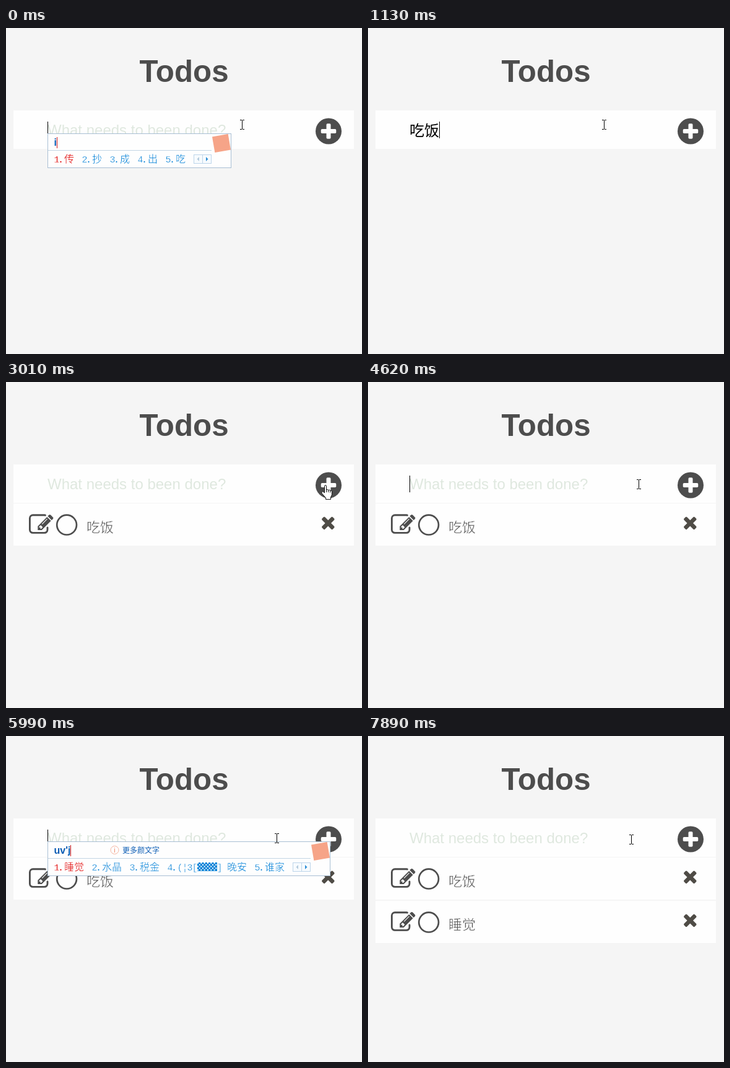
An HTML page with a canvas that plays this animation: 575x526 px, repeating every 8 s.

```html
<!DOCTYPE html>
<html lang="zh-CN">
<head>
<meta charset="utf-8">
<title>Todos</title>
<style>
  html, body { margin: 0; width: 100%; height: 100%; overflow: hidden; background: #f5f5f5; }
  canvas { display: block; }
</style>
</head>
<body>
<canvas id="stage" width="575" height="526"></canvas>
<script>
const ctx = document.getElementById('stage').getContext('2d');
const LOOP = 8000;
const INK = '#4d4d4d', PAPER = '#fefefe', BLUE = '#0a84d8', RED = '#e00000';
const SANS = '"Liberation Sans", Arial, sans-serif';
const MONO = '"Liberation Mono", monospace';
const CJK = '"Noto Sans CJK SC", "Noto Sans CJK", sans-serif';
const FACE = '١١(❛ᴗ❛)';

// Input method: time, typed keys, candidates (null closes the popup).
const popups = [
  [0, 'i', ['传', '抄', '成', '出', '吃']],
  [250, 'ii', ['吃', '持', '尺', '迟', '池']],
  [410, "ii'f", ['吃饭', '吃法', '赤饭', FACE, '吃粉']],
  [580, "ii'fj", ['吃饭', '赤饭', '吃', FACE, '迟']],
  [1130, null],
  [4740, 'u', ['是', '上', '说', '时', '手']],
  [5000, 'uv', ['谁', '水', '睡', '税', '帅']],
  [5370, "uv'j", ['睡觉', '水晶', '税金', '(¦3[▓▓] 晚安', '谁家']],
  [6120, null]
];
// Pointer: time, x, y, shape.
const pointer = [
  [0, 381, 155, ibeam], [2010, 408, 159, ibeam], [2140, 476, 169, ibeam],
  [2310, 503, 178, hand], [2570, 509, 166, hand],
  [3290, 478, 166, ibeam], [3420, 437, 164, ibeam],
  [6520, 482, 156, ibeam], [6670, 503, 157, hand],
  [7500, 490, 164, ibeam], [7740, 446, 166, ibeam], [7890, 425, 166, ibeam]
];
const typed = [[0, ''], [1130, '吃饭'], [2700, ''], [6120, '睡觉'], [7350, '']];
const todos = [[2700, '吃饭'], [7350, '睡觉']];
const caretOn = [[0, 740], [1130, 1630], [2140, 2700], [3560, 4090], [4620, 5150], [5620, 6670]];

const at = (keys, t) => keys.filter(k => k[0] <= t).pop();

function box(x, y, w, h, color) {
  ctx.fillStyle = color;
  ctx.fillRect(x, y, w, h);
}

function text(str, x, y, font, color, align = 'left') {
  ctx.font = font;
  ctx.fillStyle = color;
  ctx.textAlign = align;
  ctx.fillText(str, x, y);
}

// Trims the glyph edges for a lighter weight on white.
function thinText(str, x, y, font, color, trim, align) {
  text(str, x, y, font, color, align);
  ctx.strokeStyle = PAPER;
  ctx.lineWidth = trim;
  ctx.lineJoin = 'round';
  ctx.strokeText(str, x, y);
}

function frame(x, y, w, h, fill, line) {
  box(x, y, w, h, line);
  box(x + 1, y + 1, w - 2, h - 2, fill);
}

function bar(w, h, r, color) {
  ctx.fillStyle = color;
  ctx.beginPath();
  ctx.roundRect(-w / 2, -h / 2, w, h, r);
  ctx.fill();
}

function placed(x, y, scale, turn, draw) {
  ctx.save();
  ctx.translate(x, y);
  ctx.rotate(turn);
  ctx.scale(scale, scale);
  draw();
  ctx.restore();
}

function disc(x, y, r) {
  ctx.beginPath();
  ctx.arc(x, y, r, 0, Math.PI * 2);
}

function poly(points, color) {
  ctx.fillStyle = color;
  ctx.beginPath();
  for (let i = 0; i < points.length; i += 2) ctx.lineTo(points[i], points[i + 1]);
  ctx.closePath();
  ctx.fill();
}

function stroke(color, width) {
  ctx.strokeStyle = color;
  ctx.lineWidth = width;
  ctx.stroke();
}

function addButton() {
  ctx.fillStyle = INK;
  disc(521, 166.5, 21);
  ctx.fill();
  placed(521, 166.5, 1, 0, () => {
    bar(24.5, 7, 1.8, PAPER);
    bar(7, 24.5, 1.8, PAPER);
  });
}

function editIcon() {
  ctx.lineCap = 'round';
  ctx.beginPath();
  ctx.moveTo(1344, 1090);
  ctx.arcTo(1344, 1472, 1120, 1472, 224);
  ctx.arcTo(64, 1472, 64, 1248, 224);
  ctx.arcTo(64, 192, 288, 192, 224);
  ctx.lineTo(1120, 192);
  ctx.lineTo(1185, 200);
  stroke(INK, 128);
  poly([1312, 320, 1600, 608, 928, 1280, 640, 1280, 640, 992], INK);
  poly([888, 1184, 1004, 1068, 852, 916, 736, 1032, 736, 1088, 832, 1088, 832, 1184], PAPER);
  ctx.beginPath();
  ctx.moveTo(1311, 481);
  ctx.lineTo(961, 831);
  stroke(PAPER, 48);
  placed(1580, 340, 1, Math.PI / 4, () => bar(407, 215, [90, 90, 0, 0], INK));
}

function todoRow(label, y) {
  box(12, y, 550, 68, PAPER);
  placed(37, y + 14.5, 40 / 1792, 0, editIcon);
  disc(98.1, y + 34.6, 15.9);
  stroke(INK, 2.7);
  thinText(label, 130, y + 46, '22px ' + CJK, INK, 0.6);
  placed(520.3, y + 31.8, 1, Math.PI / 4, () => {
    bar(24.3, 6.6, 1.7, '#4f4c46');
    bar(6.6, 24.3, 1.7, '#4f4c46');
  });
}

// Candidate glyphs sit in half or full cells of a 16 px grid.
function cellWidth(ch) {
  if (ch === '▓' || ch >= '⺀') return 16;
  return { '١': 6, '❛': 6, 'ᴗ': 7 }[ch] || 8;
}

function checker(x, color) {
  box(x, 204, 16, 14, color);
  for (let j = 0; j < 5; j++)
    for (let i = 0; i < 3; i++) box(x + i * 5.3 + (j % 2) * 2.7, 204 + j * 2.8, 2, 2, PAPER);
}

function candidate(str, x, color) {
  const face = str.endsWith(FACE);
  for (const ch of str) {
    const w = face && ch === ')' ? 6 : cellWidth(ch);
    if (ch === '▓') checker(x, color);
    else if (ch === '.') text(ch, x + 2.5, 217, '15px ' + MONO, color, 'center');
    else if (ch >= '⺀') thinText(ch, x, 217, '16px ' + CJK, color, 0.35);
    else if (w < 8 && ch !== ')') text(ch, x + w / 2, 216, '11px "DejaVu Sans", sans-serif', color, 'center');
    else thinText(ch, x + w / 2, 217, '15px ' + MONO, color, 0.35, 'center');
    x += w;
  }
}

function pager(x) {
  frame(x, 204, 29, 15, '#f7fbfe', '#bdd5ea');
  box(x + 14, 204, 1, 15, '#bdd5ea');
  poly([x + 9, 208, x + 9, 215, x + 5.5, 211.5], '#b4cbdd');
  poly([x + 20, 208, x + 20, 215, x + 23.5, 211.5], '#2f8fd6');
}

function hint() {
  disc(175.5, 184, 6.5);
  stroke('#f6b5a0', 1);
  text('i', 175.5, 188, '11px ' + SANS, '#f08a6a', 'center');
  text('更多颜文字', 188, 188.5, '12px ' + CJK, '#0a5cb4');
}

function popup(keys, words, withHint) {
  const size = w => [...w].reduce((n, ch) => n + cellWidth(ch), 16) - (w === FACE ? 2 : 0);
  const right = words.reduce((x, w) => x + size(w) + 13, 78) + 61;
  frame(67, 170, right - 67, 56, PAPER, '#a9bfd4');
  box(68, 197, right - 100, 1, '#c3d5e3');
  text(keys, 77.5, 190, 'bold 16px ' + SANS, '#0a5cb4');
  box(Math.round(77.5 + ctx.measureText(keys).width), 176, 1, 18, '#d01818');
  if (withHint) hint();
  let x = 78;
  words.forEach((w, i) => {
    candidate(i + 1 + '.' + w, x, i ? BLUE : RED);
    x += size(w) + 13;
  });
  pager(x);
  placed(right - 16, 186, 1, -0.17, () => bar(26, 26, 0, '#f6a488'));
}

function ibeam(x, y) {
  box(x, y - 6, 1, 14, '#000');
  for (const dy of [-7, 8]) {
    box(x - 3, y + dy, 3, 1, '#000');
    box(x + 1, y + dy, 3, 1, '#000');
  }
}

function hand(x, y) {
  const shape = new Path2D('M5.5 13V2.2Q5.5.6 7 .6T8.5 2.2V8Q10 6.6 11.5 8.4Q13 7.2 14.5 9Q17.3 8.4 17.4 11V16L15.5 20V23.4H7.5V21L1 13.5Q.3 11 2.3 10.6Q4 11 5.5 13Z');
  const gaps = new Path2D('M8.5 8V12M11.5 8.4V12M14.5 9V12.5');
  placed(x, y, 1, 0, () => {
    ctx.fillStyle = '#fff';
    ctx.fill(shape);
    ctx.strokeStyle = '#111';
    ctx.lineWidth = 1;
    ctx.stroke(shape);
    ctx.stroke(gaps);
  });
}

function draw(t) {
  box(0, 0, 575, 526, '#f5f5f5');
  text('Todos', 287.5, 87, 'bold 49.3px ' + SANS, INK, 'center');
  box(12, 133, 550, 62, PAPER);
  const value = at(typed, t)[1];
  if (value) text(value, 67, 174, '24px ' + CJK, '#000');
  else text('What needs to been done?', 67, 173, '24px ' + SANS, '#dfe8df');
  addButton();
  todos.forEach(([start, label], i) => {
    if (t >= start) todoRow(label, 196 + i * 70);
  });
  if (caretOn.some(([a, b]) => t >= a && t < b)) box(value ? 115 : 67, 151, 1, 27, '#000');
  const [, keys, words] = at(popups, t);
  if (keys) popup(keys, words, t >= 5870);
  const [, x, y, shape] = at(pointer, t);
  shape(x, y);
}

const begin = performance.now();
function tick() {
  draw((performance.now() - begin) % LOOP);
  requestAnimationFrame(tick);
}
tick();
</script>
</body>
</html>
```
